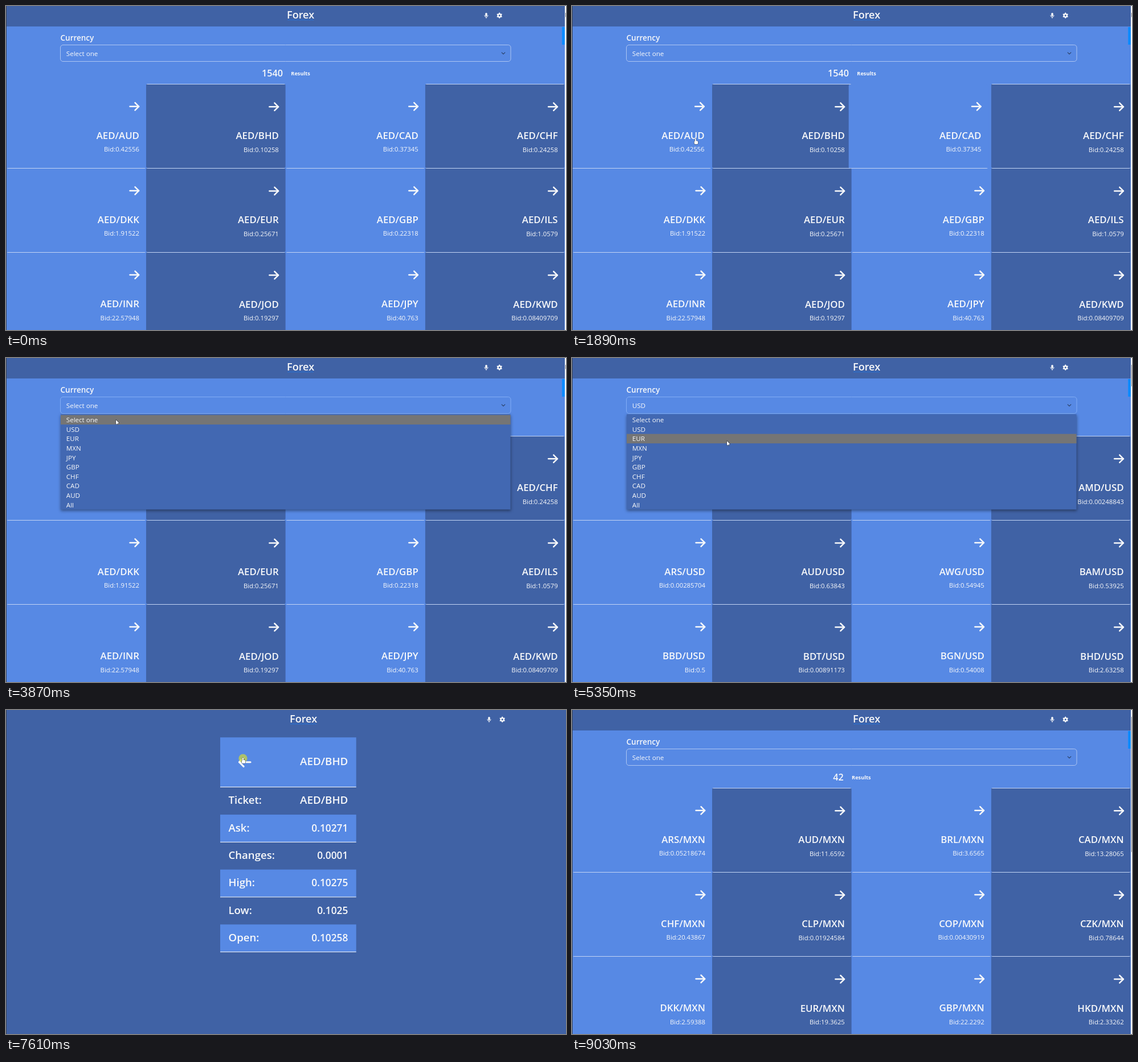
An HTML page with a canvas for the animation above (9240 ms loop, 983 px wide and 570 px high).

```html
<!DOCTYPE html>
<html lang="en">
<head>
<meta charset="utf-8">
<title>Forex</title>
<style>
html, body { margin: 0; width: 100%; height: 100%; overflow: hidden; background: #4062a5; }
canvas { display: block; }
</style>
</head>
<body>
<canvas id="stage" width="983" height="570"></canvas>
<script>
const ctx = document.getElementById('stage').getContext('2d');
const LOOP = 9240, W = 983, H = 570;
const LIGHT = '#5789e4', DARK = '#4062a5', WHITE = '#f8f9fa';
const COL = 244.9, ROW = 148.15, TOP = 137, OPTION_TOP = 100.4, OPTION_STEP = 16.6;
const SLIDE = 20, SLIDE_TIME = 280, HALO_TIME = 90;

const parse = text => text.split(' ').map(item => item.split('='));
const lists = {
  all: { count: '1540', cards: parse('AED/AUD=0.42556 AED/BHD=0.10258 AED/CAD=0.37345 AED/CHF=0.24258 AED/DKK=1.91522 AED/EUR=0.25671 AED/GBP=0.22318 AED/ILS=1.0579 AED/INR=22.57948 AED/JOD=0.19297 AED/JPY=40.763 AED/KWD=0.08409709') },
  usd: { count: '294', cards: parse('AED/USD=0.27225 AFN/USD=0.01328 ALL/USD=0.00992 AMD/USD=0.00248843 ARS/USD=0.00285704 AUD/USD=0.63843 AWG/USD=0.54945 BAM/USD=0.53925 BBD/USD=0.5 BDT/USD=0.00891173 BGN/USD=0.54008 BHD/USD=2.63258') },
  mxn: { count: '42', cards: parse('ARS/MXN=0.05218674 AUD/MXN=11.6592 BRL/MXN=3.6565 CAD/MXN=13.28065 CHF/MXN=20.43867 CLP/MXN=0.01924584 COP/MXN=0.00430919 CZK/MXN=0.78644 DKK/MXN=2.59388 EUR/MXN=19.3625 GBP/MXN=22.2292 HKD/MXN=2.33262') }
};
const options = 'Select one,USD,EUR,MXN,JPY,GBP,CHF,CAD,AUD,All'.split(',');
const details = parse('Ticket:=AED/BHD Ask:=0.10271 Changes:=0.0001 High:=0.10275 Low:=0.1025 Open:=0.10258');

// What each click does, by the time it takes effect
const click = { open: 2990, usd: 4210, reopen: 5010, mxn: 5620, detail: 6860, back: 7700 };
const within = (t, a, b) => t >= a && t < b;
const isOpen = t => within(t, click.open, click.usd) || within(t, click.reopen, click.mxn);
const isDetail = t => within(t, click.detail, click.back);

const cell = (col, row) => [1 + (col + 0.5) * COL, TOP + (row + 0.63) * ROW];
const option = (i, x = 193) => [x, OPTION_TOP + (i + 0.5) * OPTION_STEP];
const field = [190, 85], field2 = [275, 85], opener = [392, 222], back = [416, 84];
const path = [
  [110, cell(3, 3)], [800, cell(3, 0)], [1020, cell(2, 0)], [1640, cell(2, 0)],
  [1710, [500, TOP]], [1850, [240, TOP]], [1890, [217, 233]], [2300, cell(0, 1)],
  [2860, field], [click.open, field], [3430, option(9)], [3870, option(0)],
  [3940, option(1)], [click.usd, option(1)], [4800, field2], [click.reopen, field2],
  [5350, [272, 146]], [click.mxn, option(3, 270)], [6125, [246, 236]], [6180, [203, 237]],
  [6750, opener], [6990, opener], [7150, [538, 165]], [7410, back], [7960, back],
  [8250, cell(2, 0)], [8500, cell(3, 1)], [8880, cell(3, 3)]
];

const smooth = p => p * p * (3 - 2 * p);

function pointerAt(t) {
  const next = path.findIndex(([time]) => time > t);
  if (next < 1) return path[next ? path.length - 1 : 0][1];
  const [t0, a] = path[next - 1], [t1, b] = path[next];
  return a.map((v, k) => v + (b[k] - v) * (t - t0) / (t1 - t0));
}

function hoveredCard(t) {
  const [x, y] = pointerAt(t);
  if (isOpen(t) || isDetail(t) || y <= TOP || y > H) return -1;
  return Math.floor((y - TOP) / ROW) * 4 + Math.floor((x - 1) / COL);
}

// A card slides by the share of the last moments it spent under the pointer.
function cardSlides(t) {
  const share = Array(12).fill(0), step = 5;
  for (let s = 0; s < SLIDE_TIME; s += step) {
    const i = hoveredCard(t - s);
    if (i >= 0) share[i] += step / SLIDE_TIME;
  }
  return share.map(p => -SLIDE * smooth(Math.min(1, p)));
}

function box(x, y, w, h, color) {
  ctx.fillStyle = color;
  ctx.fillRect(x, y, w, h);
}

function setFont(size, weight) {
  ctx.font = `${weight} ${size}px "Open Sans", "Noto Sans", sans-serif`;
}

function label(text, x, y, size, weight = 600, align = 'left') {
  setFont(size, weight);
  ctx.textAlign = align;
  ctx.fillStyle = WHITE;
  ctx.fillText(text, x, y);
}

function line(points, color, width) {
  ctx.beginPath();
  points.forEach(([x, y]) => ctx.lineTo(x, y));
  ctx.strokeStyle = color;
  ctx.lineWidth = width;
  ctx.lineCap = ctx.lineJoin = 'round';
  ctx.stroke();
}

function disc(x, y, r, color) {
  ctx.beginPath();
  ctx.arc(x, y, r, 0, 2 * Math.PI);
  ctx.fillStyle = color;
  ctx.fill();
}

function arrow(tipX, y, length, head, width) {
  const backX = tipX - Math.sign(length) * head;
  line([[tipX - length, y], [tipX, y]], WHITE, width);
  line([[backX, y - head], [tipX, y], [backX, y + head]], WHITE, width);
}

function icons(x) {
  line([[x, 13.6], [x, 16.5]], WHITE, 3.4);
  ctx.beginPath();
  ctx.arc(x, 16.4, 3.1, 0, Math.PI);
  ctx.lineWidth = 0.9;
  ctx.stroke();
  line([[x, 19.5], [x, 21.2]], WHITE, 1.2);

  const gx = x + 23.2, gy = 16.7;
  for (let i = 0; i < 3; i++) {
    const angle = Math.PI * (i / 3 + 0.5);
    const c = Math.cos(angle) * 4, s = Math.sin(angle) * 4;
    line([[gx - c, gy - s], [gx + c, gy + s]], WHITE, 2.2);
  }
  disc(gx, gy, 3.7, WHITE);
  disc(gx, gy, 1.5, DARK);
}

function header(shift) {
  box(1, 0, 980, 36, DARK);
  box(494 + shift, 24, 46, 1, 'rgba(20, 125, 250, .6)');
  label('Forex', 493 + shift, 22, 18.1);
  icons(843 + shift);
}

function card([pair, bid], index, slide) {
  const col = index % 4, dark = col % 2;
  const x = 1 + col * COL + slide, y = TOP + Math.floor(index / 4) * ROW;
  const top = Math.round(y), bottom = Math.round(y + ROW);
  const right = x + COL - 12, textY = y + 0.6 + dark * 0.5;

  ctx.save();
  ctx.beginPath();
  if (dark) ctx.roundRect(x, top, COL, bottom - top, 3);
  else ctx.roundRect(x, top + 1, COL, bottom - top, 3);
  ctx.clip();
  box(x, top, COL, ROW + 2, dark ? DARK : LIGHT);
  box(x, dark ? top : bottom, COL, 1, '#c3d4f4');
  arrow(right - 0.8, textY + 39.2, 15.6, 6.6, 2.5);
  label(pair, right, textY + 96.2, 16.8, 600, 'right');
  label('Bid:' + bid, right, textY + 118.7, 11.3, 500, 'right');
  ctx.restore();
}

function select(value, focused) {
  label('Currency', 95.5, 60.5, 13.5);
  ctx.beginPath();
  ctx.roundRect(95.5, 68.5, 790.5, 29, 4.5);
  ctx.strokeStyle = focused ? '#82adf5' : '#adc5f2';
  ctx.lineWidth = 1;
  ctx.stroke();
  label(value, 105.8, 87.8, 11.6, 500);
  line([[870.2, 81.8], [873, 84.6], [875.8, 81.8]], '#2c4168', 1.2);
}

function dropdown(selected, pointerY) {
  ctx.save();
  ctx.shadowColor = 'rgba(0, 0, 0, .4)';
  ctx.shadowBlur = 5;
  ctx.shadowOffsetY = 2;
  box(96, 99, 789.5, 167.5, '#4268b2');
  ctx.restore();
  const under = Math.floor((pointerY - OPTION_TOP) / OPTION_STEP);
  const active = options[under] ? under : selected;
  box(96, OPTION_TOP + active * OPTION_STEP, 789.5, OPTION_STEP, '#757575');
  options.forEach((name, i) => label(name, 105.8, OPTION_TOP + 12.8 + i * OPTION_STEP, 11.6, 500));
}

function results(count) {
  setFont(16.2, 600);
  const width = ctx.measureText(count).width;
  const left = 490.7 - (width + 46.3) / 2;
  label(count, left, 124, 16.2);
  label('Results', left + width + 14.3, 121.5, 9.2, 700);
}

function scrollbar(count) {
  const pageHeight = TOP + Math.ceil(count / 4) * ROW;
  box(981, 0, 2, H, '#fafafa');
  box(982, 12, 1, 737 * H / pageHeight, '#8b8b8b');
}

function listPage(t) {
  const list = t < click.usd ? lists.all : t < click.mxn ? lists.usd : lists.mxn;
  const selected = within(t, click.usd, click.mxn) ? 1 : within(t, click.mxn, click.back) ? 3 : 0;
  const slides = cardSlides(t);

  box(0, 0, W, H, LIGHT);
  header(0);
  box(976, 37, 5, 31, '#0f8bfd');
  select(options[selected], within(t, click.open, click.back));
  results(list.count);
  list.cards.forEach((data, i) => card(data, i, slides[i]));
  if (isOpen(t)) dropdown(selected, pointerAt(t)[1]);
  scrollbar(list.count);
}

function detailPage() {
  const x = 376, right = 600.3, width = 238.7, rowHeight = 48.3;
  box(0, 0, W, H, DARK);
  header(5);
  box(x, 48.2, width, 87, LIGHT);
  box(x, 135, width, 1, WHITE);
  arrow(409.5, 91.7, -19.5, 7.6, 3.1);
  label('AED/BHD', right, 97.3, 18.8, 600, 'right');
  details.forEach(([name, value], i) => {
    const y = 135.8 + i * rowHeight;
    if (i % 2) {
      box(x, y, width, rowHeight, LIGHT);
      box(x, y + rowHeight - 0.5, width, 1, WHITE);
    }
    label(name, 390.5, y + 29.6, 18.6);
    label(value, right, y + 29.6, isNaN(value) ? 18.8 : 17.3, 600, 'right');
  });
}

function outlined(draw) {
  ctx.beginPath();
  draw();
  ctx.fillStyle = '#fff';
  ctx.strokeStyle = '#1c2333';
  ctx.lineWidth = 0.9;
  ctx.stroke();
  ctx.fill();
}

function drawPointer(t) {
  const [x, y] = pointerAt(t);
  if (Object.values(click).some(time => within(t, time - HALO_TIME, time))) {
    disc(x, y + 1, 7.6, 'rgba(205, 215, 60, .72)');
  }
  const onBack = isDetail(t) && x < 435 && y < 105;
  if (hoveredCard(t) >= 0 || onBack) {
    outlined(() => {
      ctx.roundRect(x - 1, y - 0.3, 2, 7, 1);
      ctx.roundRect(x - 2.2, y + 4, 6.6, 6, 2);
    });
  } else {
    outlined(() => {
      ctx.moveTo(x, y);
      ctx.lineTo(x, y + 8);
      ctx.lineTo(x + 2, y + 6.3);
      ctx.lineTo(x + 3.6, y + 9);
      ctx.lineTo(x + 3.3, y + 5.8);
      ctx.lineTo(x + 5.6, y + 5.6);
      ctx.closePath();
    });
  }
}

const start = performance.now();
function frame() {
  const t = Math.max(0, performance.now() - start) % LOOP;
  if (isDetail(t)) detailPage();
  else listPage(t);
  box(0, 0, 1, H, '#3a414f');
  drawPointer(t);
  requestAnimationFrame(frame);
}
frame();
</script>
</body>
</html>
```
